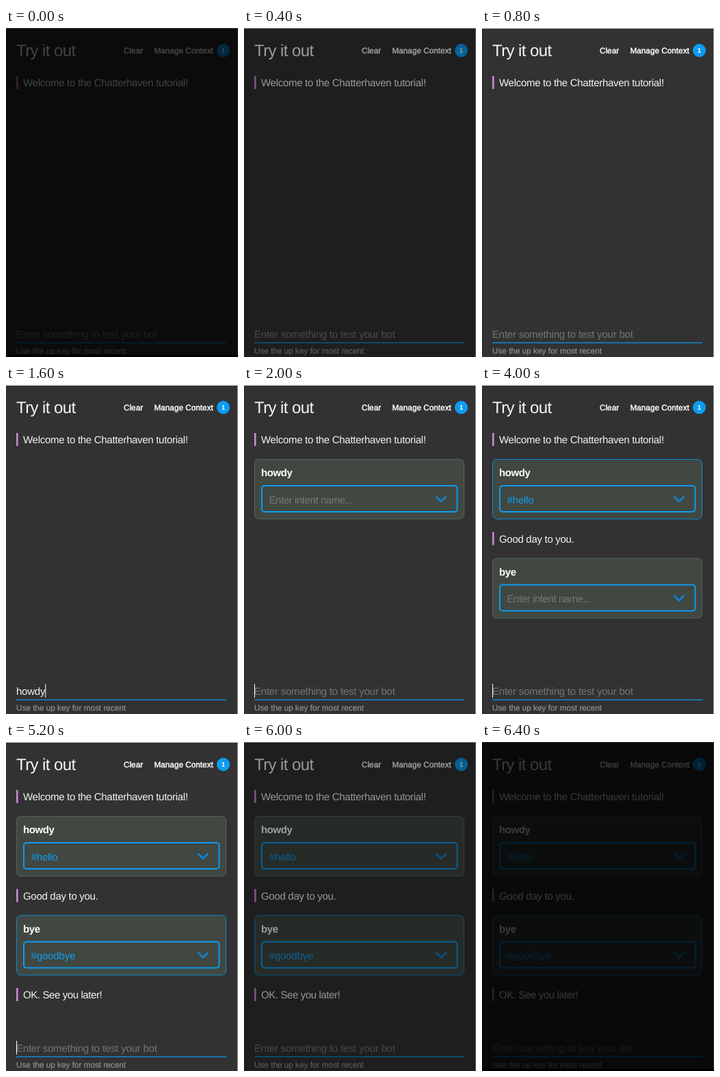
Recreate the animation shown at these times as an HTML page. Size 339 by 480 pixels, loop 6.6 s.

```html
<!DOCTYPE html>
<html lang="en">
<head>
<meta charset="utf-8">
<title>Try it out</title>
<style>
  html, body { margin: 0; width: 100%; height: 100%; overflow: hidden; background: #000; }
  svg { display: block; width: 100vw; height: 100vh; }
  text { font-family: "Liberation Sans", Arial, sans-serif; font-size: 15px; fill: #f4f4f4; white-space: pre; text-rendering: geometricPrecision; }
  .title { font-size: 24px; letter-spacing: -.6px; fill: #f6f6f6; }
  .menu { font-size: 11.7px; letter-spacing: .04px; fill: #fff; stroke: #fff; stroke-width: .45px; }
  .badge { font-size: 9.5px; font-weight: bold; fill: #fff; text-anchor: middle; }
  .bold { font-weight: bold; letter-spacing: -.4px; fill: #fff; }
  .muted { fill: #757575; letter-spacing: -.22px; }
  .hint { font-size: 11.7px; letter-spacing: .03px; fill: #8f8f8f; stroke: #8f8f8f; stroke-width: .25px; }
  .intent { letter-spacing: -.15px; fill: #129aec; }
  .empty { letter-spacing: -.42px; fill: #737a75; }
</style>
</head>
<body>
<svg viewBox="0 0 339 480" preserveAspectRatio="none" xmlns="http://www.w3.org/2000/svg">
  <defs>
    <filter id="dim" filterUnits="userSpaceOnUse" x="0" y="0" width="339" height="480" color-interpolation-filters="sRGB">
      <feComponentTransfer>
        <feFuncR type="linear"/><feFuncG type="linear"/><feFuncB type="linear"/>
      </feComponentTransfer>
    </filter>
  </defs>
  <g id="scene">
    <rect width="339" height="480" fill="#323233"/>
    <rect width="339" height="1" fill="#d4d4d0"/>
    <rect x="338" width="1" height="480" fill="#a9b4b4"/>
    <text class="title" x="15" y="41">Try it out</text>
    <text class="menu" x="172" y="37">Clear</text>
    <text class="menu" x="216.5" y="37">Manage Context</text>
    <circle cx="317.5" cy="32.7" r="9.6" fill="#0d9bf0"/>
    <text class="badge" x="317.5" y="36.3">1</text>
    <g id="chat"></g>
    <text id="prompt" class="muted" x="15" y="452">Enter something to test your bot</text>
    <text id="typed" x="15" y="452" letter-spacing="-.22"></text>
    <rect id="caret" y="436" width="1" height="20" fill="#fff"/>
    <rect x="15" y="458.5" width="307" height="1.5" fill="#1188cc"/>
    <text class="hint" x="15" y="474.5">Use the up key for most recent</text>
  </g>
  <rect id="foot" y="477" width="339" height="3"/>
</svg>
<script>
const LOOP = 6600, STEP = 200;
const $ = id => document.getElementById(id);
const chat = $('chat');
const slopes = document.querySelectorAll('#dim feFuncR, #dim feFuncG, #dim feFuncB');

function add(parent, tag, attrs, text = '') {
  const el = document.createElementNS('http://www.w3.org/2000/svg', tag);
  for (const key in attrs) el.setAttribute(key, attrs[key]);
  el.textContent = text;
  return parent.appendChild(el);
}

function addReply(y, text, spacing) {
  const g = add(chat, 'g', {});
  add(g, 'rect', { x: 15, y, width: 2.6, height: 19, fill: '#cb87d6' });
  add(g, 'text', { x: 25, y: y + 15.3, 'letter-spacing': spacing }, text);
  return g;
}

function addCard(y, said) {
  const g = add(chat, 'g', {});
  const frame = add(g, 'rect', { x: 15.5, y: y + .5, width: 306, height: 87, rx: 6, fill: '#404841' });
  add(g, 'text', { class: 'bold', x: 25, y: y + 25 }, said);
  add(g, 'rect', { x: 26, y: y + 39, width: 285.5, height: 38, rx: 4, fill: 'none', stroke: '#0d9bf0', 'stroke-width': 2 });
  add(g, 'path', { d: `M280.5 ${y + 54.5}l7.5 7.5 7.5-7.5`, fill: 'none', stroke: '#157fcb', 'stroke-width': 3 });
  const value = add(g, 'text', { x: 36.5, y: y + 64.5 });
  return { g, frame, value };
}

const show = (el, on) => el.setAttribute('visibility', on ? 'visible' : 'hidden');
const within = (t, a, b) => t >= a && t < b;

addReply(70, 'Welcome to the Chatterhaven tutorial!', -.29);

const turns = [
  { card: addCard(108, 'howdy'), reply: addReply(214.5, 'Good day to you.', -.3),
    intent: '#hello', sent: 2000, matched: 2200, answered: 2800, lit: [2800, 4600],
    keys: [[1200, 'h'], [1400, 'ho'], [1600, 'howdy']] },
  { card: addCard(252.5, 'bye'), reply: addReply(359, 'OK. See you later!', -.4),
    intent: '#goodbye', sent: 4000, matched: 4400, answered: 4400, lit: [4600, LOOP],
    keys: [[3400, 'b'], [3600, 'by'], [3800, 'bye']] }
];
const caretOn = [[1200, 2600], [3000, 4600], [5200, 5600]];

// Latest typed text of the turn still being written
function typedAt(t) {
  let text = '';
  for (const { keys, sent } of turns)
    if (t < sent) for (const [at, value] of keys) if (t >= at) text = value;
  return text;
}

function brightness(t) {
  if (t < 800) return .28 + .18 * Math.floor(t / STEP);
  if (t >= 5800) return .82 - .193 * Math.floor((t - 5800) / STEP);
  return 1;
}

function setFade(k) {
  if (k === 1) $('scene').removeAttribute('filter');
  else {
    for (const fn of slopes) {
      fn.setAttribute('slope', k);
      fn.setAttribute('intercept', -.013 * (1 - k));
    }
    $('scene').setAttribute('filter', 'url(#dim)');
  }
  show($('foot'), k < .4);
}

function render(now) {
  const t = Math.floor((now % LOOP) / STEP) * STEP;
  for (const { card, reply, intent, sent, matched, answered, lit } of turns) {
    const known = t >= matched;
    show(card.g, t >= sent);
    show(reply, t >= answered);
    card.value.textContent = known ? intent : 'Enter intent name...';
    card.value.setAttribute('class', known ? 'intent' : 'empty');
    card.frame.setAttribute('stroke', within(t, ...lit) ? '#1189cf' : '#56645a');
  }
  const text = typedAt(t);
  $('typed').textContent = text;
  show($('prompt'), !text);
  $('caret').setAttribute('x', 15 + (text ? $('typed').getComputedTextLength() : 0));
  show($('caret'), caretOn.some(span => within(t, ...span)));
  setFade(brightness(t));
}

const start = performance.now();
function tick() {
  render(performance.now() - start);
  requestAnimationFrame(tick);
}
tick();
</script>
</body>
</html>
```
